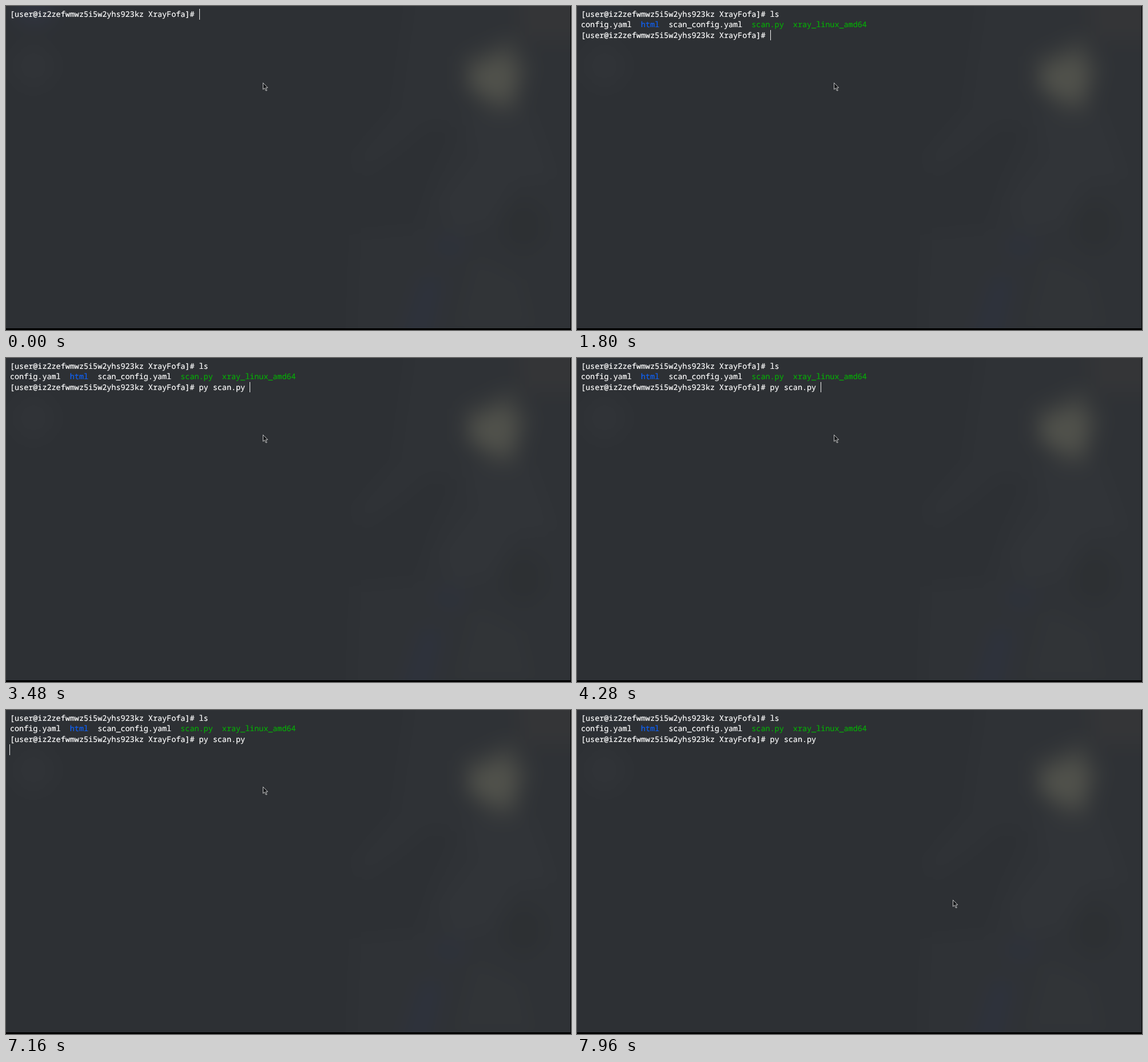
An HTML page for the animation above (8 s loop, 988 by 567 pixels).

```html
<!DOCTYPE html>
<html lang="en">
<head>
<meta charset="utf-8">
<title>Terminal session</title>
<style>
  html, body { margin: 0; width: 100%; height: 100%; overflow: hidden; background: #000; }
  svg { display: block; width: 988px; height: 567px; }
  text {
    font: 13.458px "Noto Sans Mono", monospace;
    text-rendering: geometricPrecision;
    white-space: pre;
    fill: #fff;
    stroke: #fff;
    stroke-width: .22px;
  }
  .dir { fill: #1062f8; stroke: #1062f8; }
  .exe { fill: #08aa08; stroke: #08aa08; }
</style>
</head>
<body>
<svg viewBox="0 0 988 567">
  <defs>
    <filter id="soft" x="0" y="0" width="1" height="1" color-interpolation-filters="sRGB">
      <feGaussianBlur stdDeviation="16"/>
    </filter>
    <clipPath id="screen"><path d="M0 0H987V564H0Z"/></clipPath>
  </defs>

  <g clip-path="url(#screen)">
    <!-- the opaque base is blurred together with the shapes, so faint tones keep their hue -->
    <g filter="url(#soft)">
      <rect x="-100" y="-100" width="1188" height="767" fill="#2d3034"/>
      <path d="M720 -100H1088V667H600L610 400L720 390L750 300L790 215L740 205L690 250L620 300L610 260L680 180Z" fill="#2f3236"/>
      <path d="M800 190L920 190L960 300L890 310L850 380L780 400L760 340L820 260Z" fill="#313438"/>
      <ellipse cx="905" cy="385" rx="38" ry="45" fill="#2d3033"/>
      <path d="M890 -100H1088V60H900Z" fill="#343537"/>
      <path d="M820 440L900 480L920 560H790Z" fill="#313437"/>
      <ellipse cx="775" cy="420" rx="24" ry="18" fill="#2e323c"/>
      <path d="M726 475H765L738 600H685Z" fill="#2e323c"/>
      <path d="M798 90L885 50L918 105L895 190L845 190L798 145Z" fill="#3b3d3d"/>
      <path d="M815 108L878 82L894 120L880 168L845 160L816 140Z" fill="#50514b"/>
      <ellipse cx="48" cy="105" rx="38" ry="40" fill="#303337"/>
      <ellipse id="glow" cx="50" cy="8" rx="36" ry="26" fill="#30343f"/>
    </g>
  </g>

  <text id="first" x="6.95" y="19"></text>
  <text id="listing" x="6.95" y="37">config.yaml  <tspan class="dir">html</tspan>  scan_config.yaml  <tspan class="exe">scan.py</tspan>  <tspan class="exe">xray_linux_amd64</tspan></text>
  <text id="second" x="6.95" y="56"></text>
  <rect id="caret" width="1" fill="#f4f4f4"/>
  <path id="pointer" d="M.5 .5V12L3.2 9.5L5.2 14H7.2L5.3 9H8.8Z" fill="#16181a" stroke="#e0e0e0" stroke-width=".85"/>
</svg>

<script>
const LOOP = 8000, TICK = 40, CELL = 8.075, LEFT = 6.95;
const LISTED = 1800;
const PROMPT = "[user@iz2zefwmwz5i5w2yhs923kz XrayFofa]# ";
const ROW_TOP = [5, 24, 42, 60];
const ROW_HEIGHT = [19, 18, 18, 19];
const $ = id => document.getElementById(id);

// [time, command being typed]
const firstCommand = [[0, ""], [1280, "l"], [1400, "ls"]];
const secondCommand = [
  [0, null], [LISTED, ""], [2160, "p"], [2480, "py"], [2680, "py "],
  [2840, "py s"], [2920, "py sc"], [2960, "py sca"], [3040, "py scan"],
  [3400, "py scan."], [3480, "py scan.py "], [3800, "py scan.py  "], [4240, "py scan.py "]
];
// [time, caret row], -1 while hidden
const caretRow = [
  [0, 0], [240, -1], [800, 0], [LISTED, 2], [4880, 3],
  [5560, -1], [6040, 3], [6600, -1], [7160, 3], [7720, -1]
];
// [time, x, y]
const pointerPath = [[7360, 449, 134], [7560, 469, 147], [7960, 657, 332]];

const at = (steps, t) => steps.findLast(step => step[0] <= t)[1];
// smooth sweep that is already moving when it begins
const sweep = p => .3 * p + .7 * p * p * (3 - 2 * p);

function pointerAt(t) {
  const [start, bend, end] = pointerPath;
  const [a, b] = t < bend[0] ? [start, bend] : [bend, end];
  const p = Math.min(1, Math.max(0, (t - a[0]) / (b[0] - a[0])));
  const k = a === bend ? sweep(p) : p;
  return [1, 2].map(i => Math.round(a[i] + (b[i] - a[i]) * k));
}

function setText(id, value) {
  if ($(id).textContent !== value) $(id).textContent = value;
}

function draw(now) {
  const t = Math.floor(now % LOOP / TICK) * TICK;
  const one = PROMPT + at(firstCommand, t);
  const command = at(secondCommand, t);
  const two = command === null ? "" : PROMPT + command;
  setText("first", one);
  setText("second", two);
  $("listing").style.visibility = t >= LISTED ? "visible" : "hidden";
  $("glow").style.opacity = t < LISTED ? 1 : .3;

  const row = at(caretRow, t), caret = $("caret");
  caret.style.visibility = row < 0 ? "hidden" : "visible";
  if (row >= 0) {
    const column = row === 0 ? one.length : row === 2 ? two.length : 0;
    caret.setAttribute("x", Math.floor(LEFT + CELL * column));
    caret.setAttribute("y", ROW_TOP[row]);
    caret.setAttribute("height", ROW_HEIGHT[row]);
  }
  $("pointer").setAttribute("transform", `translate(${pointerAt(t)})`);
}

const begin = performance.now();
function loop() {
  draw(performance.now() - begin);
  requestAnimationFrame(loop);
}
loop();
</script>
</body>
</html>
```
